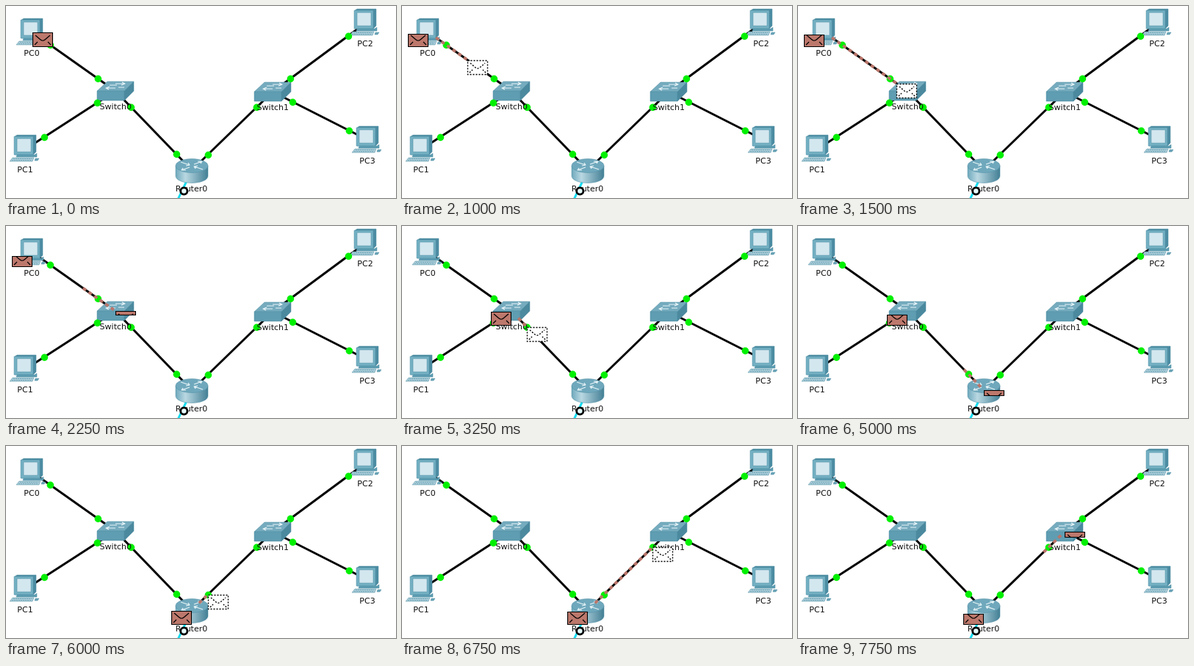
These frames come from a looping animation (531 by 262 pixels, 8 s). An HTML page:

```html
<!DOCTYPE html>
<html lang="en">
<head>
<meta charset="utf-8">
<title>Packet walk</title>
<style>
  html, body { margin: 0; width: 100%; height: 100%; overflow: hidden; background: #fff; }
  svg { display: block; width: 100vw; height: 100vh; }
  text { font: 11px "DejaVu Sans", Verdana, sans-serif; text-anchor: middle; fill: #111; }
  .link { stroke: #000; stroke-width: 3; }
  .dot { fill: #00f000; }
  .edge { stroke: #4f8da3; stroke-width: .5; stroke-linejoin: round; }
  .arrow { fill: none; stroke: #e6f3f7; stroke-width: 1.2; }
  .mail { fill: #bd786c; stroke: #000; stroke-width: 1.2; }
  .flap { fill: none; }
  .ghost { fill: #fff; stroke: #000; stroke-width: 1.4; stroke-dasharray: 2 2; }
  .trail { stroke: #b9756a; stroke-width: 4; stroke-dasharray: 5 4.3; }
</style>
</head>
<body>
<svg viewBox="0 0 531 262" preserveAspectRatio="none">
  <defs>
    <linearGradient id="metal">
      <stop offset="0" stop-color="#6fa9bc"/>
      <stop offset=".3" stop-color="#b9d8e2"/>
      <stop offset="1" stop-color="#437f95"/>
    </linearGradient>
    <g id="pc" class="edge">
      <path d="M-15-17L-12-19H14V4L10 8H-15Z" fill="#4c8ca2"/>
      <path d="M-16-17H10V8H-16Z" fill="#74b0c3"/>
      <path d="M-12-14H7V4H-12Z" fill="#d3e7ef"/>
      <path d="M-12 8H12L15 6V11H-13Z" fill="#5d9db2"/>
      <path d="M-18 12H11L9 17H-22Z" fill="#a9ccd8"/>
      <path d="M-17 13.5H8M-19 15.5H7" stroke="#4f8da3" stroke-dasharray="2 1"/>
      <path d="M13 13H18L16 16H12Z" fill="#6ba6b9"/>
    </g>
    <g id="switch" class="edge">
      <path d="M-25 0L-11-13H25L12 0Z" fill="#75abbe"/>
      <path d="M-25 0H12V13H-25Z" fill="#5f9db2"/>
      <path d="M12 0L25-13V0L12 13Z" fill="#4b899f"/>
      <path class="arrow" d="M0-10H12M9-12L13-10L8-8M-12-4H0M-8-6L-13-4L-9-2M-8-8H2M4-5H12"/>
    </g>
    <g id="router" class="edge">
      <path d="M-22-6V8A22 9.5 0 0 0 22 8V-6Z" fill="url(#metal)"/>
      <ellipse cy="-6" rx="22" ry="9.5" fill="#6fa8bc"/>
      <path class="arrow" stroke-width="2" d="M-15-11L-3-7M-8-6L-3-7L-5-10M15-1L3-5M8-6L3-5L5-2M3-8L14-12M8-12L14-12L12-9M-3-4L-14 0M-8 0L-14 0L-12-3"/>
    </g>
    <g id="letter">
      <path d="M.5.5H27.5V19.5H.5Z"/>
      <path class="flap" d="M4 4L11 10Q14 12.5 17 10L24 4M3 17L7 13M25 17L21 13"/>
    </g>
    <clipPath id="sentClip"><rect id="sentBox" width="28" height="20"/></clipPath>
    <clipPath id="gotClip"><rect id="gotBox" width="28" height="20"/></clipPath>
  </defs>
  <g id="scene"></g>
  <line id="trail" class="trail"/>
  <g id="sent"><g clip-path="url(#sentClip)"><use href="#letter" class="mail"/><path id="sentTop" stroke="#000" d="M0 0H28"/></g></g>
  <g id="got"><g clip-path="url(#gotClip)"><use href="#letter" class="mail"/><path id="gotEnd" stroke="#000" d="M0 0H28"/></g></g>
  <use id="ghost" href="#letter" class="ghost"/>
</svg>
<script>
const $ = id => document.getElementById(id);
const STEP = 250, LOOP = 8000, HOP = 11, SIZE = 20;

// offset of a label from its device, by icon
const labelAt = { pc: [-1, 32], switch: [0.3, 25], router: [-0.5, 29] };
// name: [icon, x, y]
const devices = {
  PC0: ['pc', 36, 36],
  PC1: ['pc', 27, 195],
  PC2: ['pc', 490, 23],
  PC3: ['pc', 493, 183],
  Switch0: ['switch', 149, 116],
  Switch1: ['switch', 363, 117],
  Router0: ['router', 253, 224]
};
// two ends, then the status light near each end
const links = [
  ['PC0', 'Switch0', 60, 53, 125, 99],
  ['PC1', 'Switch0', 52, 179, 124, 132],
  ['Switch0', 'Router0', 170, 138, 232, 202],
  ['Router0', 'Switch1', 275, 203, 341, 138],
  ['Switch1', 'PC2', 387, 99, 466, 41],
  ['Switch1', 'PC3', 390, 131, 467, 170]
];
const route = ['PC0', 'Switch0', 'Router0', 'Switch1'];

const at = name => ({ x: devices[name][1], y: devices[name][2] });
const mix = (a, b, p) => ({ x: a.x + (b.x - a.x) * p, y: a.y + (b.y - a.y) * p });
const line = (a, b, extra) => `<line x1="${a.x}" y1="${a.y}" x2="${b.x}" y2="${b.y}" ${extra}/>`;
const dot = (x, y) => `<circle class="dot" cx="${x + 0.4}" cy="${y + 0.4}" r="4.8"/>`;

function buildScene() {
  let s = links.map(([a, b]) => line(at(a), at(b), 'class="link"')).join('');
  s += line(at('Router0'), { x: 234.5, y: 263 }, 'stroke="#16dcf0" stroke-width="3"');
  for (const [icon, x, y] of Object.values(devices))
    s += `<use href="#${icon}" x="${x}" y="${y}"/>`;
  s += links.map(([, , x1, y1, x2, y2]) => dot(x1, y1) + dot(x2, y2)).join('');
  for (const [name, [icon, x, y]] of Object.entries(devices)) {
    const [dx, dy] = labelAt[icon];
    s += `<text x="${x + dx}" y="${y + dy}">${name}</text>`;
  }
  s += '<circle cx="242.3" cy="252.5" r="4.6" fill="#e8fbfd" stroke="#000" stroke-width="2.8"/>';
  $('scene').innerHTML = s;
}

const show = (el, on) => el.setAttribute('visibility', on ? 'visible' : 'hidden');
const move = (el, x, y) => el.setAttribute('transform', `translate(${Math.round(x)} ${Math.round(y)})`);

function draw(time) {
  const step = Math.max(0, Math.floor(time / STEP) - 1);
  const hop = Math.floor(step / HOP), local = step % HOP;
  const a = at(route[hop]), b = at(route[hop + 1]);
  const s = hop ? local : local - 0.65; // the first hop leaves a little late
  const p = 0.2 * s;
  const waiting = local === 0, travelling = !waiting && p < 1;

  // outgoing copy drains from the top
  const drained = Math.round(0.62 * local);
  show($('sent'), !waiting);
  move($('sent'), a.x - 28, a.y);
  $('sentBox').setAttribute('y', drained);
  $('sentTop').setAttribute('transform', `translate(0 ${drained + 0.5})`);

  // incoming copy fills downwards
  const filled = waiting ? SIZE : Math.max(0, Math.round((s - 5) * 2.67));
  const home = waiting ? a : b;
  show($('got'), filled > 0);
  move($('got'), home.x, home.y);
  $('gotBox').setAttribute('height', filled);
  $('gotEnd').setAttribute('transform', `translate(0 ${filled - 0.5})`);

  const head = mix(a, b, p);
  show($('ghost'), travelling);
  move($('ghost'), head.x, head.y);

  const tail = Math.max(0.09, 0.2 * (s - 4.3)), tip = Math.min(p, 0.98);
  const from = mix(a, b, tail), to = mix(a, b, tip), trail = $('trail');
  show(trail, !waiting && tip > tail);
  trail.setAttribute('x1', from.x);
  trail.setAttribute('y1', from.y);
  trail.setAttribute('x2', to.x);
  trail.setAttribute('y2', to.y);
}

buildScene();
const start = performance.now();
function tick() {
  draw((performance.now() - start) % LOOP);
  requestAnimationFrame(tick);
}
tick();
</script>
</body>
</html>
```
